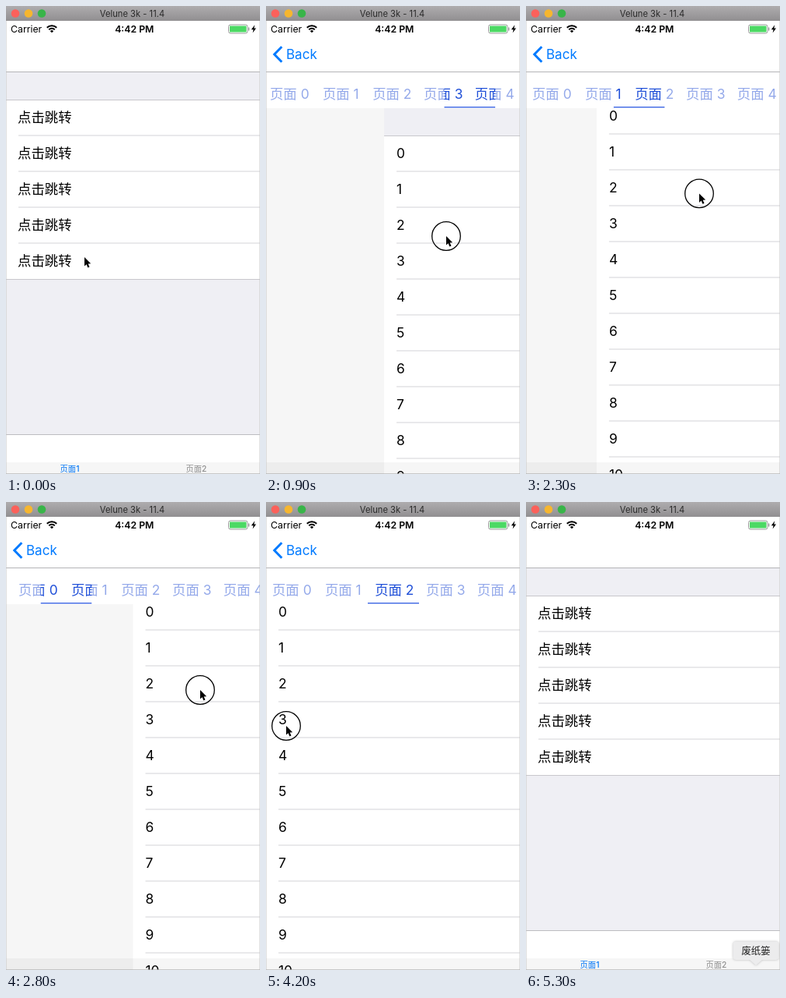
An HTML page with a canvas that plays this animation: 327x600 px, repeating every 5400 ms.

```html
<!DOCTYPE html>
<html lang="zh">
<head>
<meta charset="utf-8">
<style>
html, body { margin: 0; width: 100%; height: 100%; overflow: hidden; background: #fff; }
canvas { display: block; }
</style>
</head>
<body>
<canvas id="stage" width="327" height="600"></canvas>
<script>
const ctx = document.getElementById('stage').getContext('2d');
const W = 327, H = 600, LOOP = 5400, STEP = 100;
const FONT = 'Inter, "Noto Sans CJK SC", "Noto Sans CJK", sans-serif';
const BLUE = '#007aff', LINE = '#c8c7cc', GROUP = '#efeff4';
const ROW = 46, BODY = 17.4, TAB = 66, STRIP_BOTTOM = 131;

// Keyframes: [time, value, 'out' to decelerate into it]
const PUSH = [[200, 0], [600, 1, 'out'], [4200, 1], [4500, .465], [4600, .2], [4900, 0, 'out']];
const PAGE = [[700, 4], [900, 3.535], [1000, 3.3], [1200, 3, 'out'], [1300, 3], [1500, 2, 'out'],
  [2000, 2], [2300, 1.722], [2400, 1.55], [2600, 1, 'out'], [2600, 1], [2800, .5], [3000, 0, 'out'],
  [3600, 0], [3800, 2, 'out']];
const STRIP = [[1300, -3], [1500, 0], [2500, 0], [2700, 8], [3600, 8], [3800, 0]];
const SCROLL = [[1900, 0], [2100, 48, 'out']];
const MOUSE_X = [[100, 101], [500, 84], [700, 80], [900, 232], [1000, 285], [1300, 160], [1400, 160],
  [1600, 128], [2000, 133], [2300, 223], [2400, 270], [2600, 100], [2800, 250], [3000, 262],
  [3500, 163], [3700, 163], [4200, 26], [4500, 201], [4600, 270], [4800, 285], [5200, 296]];
const MOUSE_Y = [[100, 322], [700, 297], [1000, 294], [1300, 115], [1400, 115], [1600, 227],
  [2000, 240], [2800, 241], [3000, 238], [3500, 119], [3700, 119], [4200, 287], [4600, 286],
  [5200, 612]];
const TOUCHES = [[100, 200], [700, 1000], [1300, 1400], [2000, 2400], [2600, 2800], [3600, 3700], [4200, 4600]];
const TAB_TAPS = [[1300, 1500], [3600, 3800]];

function track(keys, t) {
  if (t <= keys[0][0]) return keys[0][1];
  for (let i = 1; i < keys.length; i++) {
    const [t0, v0] = keys[i - 1], [t1, v1, ease] = keys[i];
    if (t < t1) {
      const k = (t - t0) / (t1 - t0);
      return v0 + (v1 - v0) * (ease ? 1 - (1 - k) ** 3 : k);
    }
  }
  return keys[keys.length - 1][1];
}

const within = (spans, t) => spans.some(([a, b]) => t >= a && t <= b);

function rect(x, y, w, h, color) {
  ctx.fillStyle = color;
  ctx.fillRect(x, y, w, h);
}

function text(str, x, cy, size, color, align = 'left', weight = 400) {
  ctx.font = `${weight} ${size}px ${FONT}`;
  ctx.textAlign = align;
  ctx.fillStyle = color;
  ctx.fillText(str, x, cy + size * .365);
}

function disc(x, y, r, color) {
  ctx.fillStyle = color;
  ctx.beginPath();
  ctx.arc(x, y, r, 0, 7);
  ctx.fill();
}

function roundBox(x, y, w, h, r) {
  ctx.beginPath();
  ctx.roundRect(x, y, w, h, r);
}

function poly(points, x = 0, y = 0) {
  ctx.beginPath();
  points.forEach(([px, py]) => ctx.lineTo(x + px, y + py));
}

function clipped(x, y, w, h, draw) {
  ctx.save();
  ctx.beginPath();
  ctx.rect(x, y, w, h);
  ctx.clip();
  draw();
  ctx.restore();
}

function titleBar() {
  const shade = ctx.createLinearGradient(0, 0, 0, 19);
  shade.addColorStop(0, '#aeacae');
  shade.addColorStop(1, '#918f91');
  rect(0, 0, W, 19, shade);
  ['#fb615b', '#f6b62f', '#38b549'].forEach((c, i) => disc(12 + 17 * i, 9.5, 5.3, c));
  text('Velune 3k - 11.4', 162.5, 9.5, 11.2, '#2a2a2a', 'center');
}

function statusBar() {
  text('Carrier', 6, 29.5, 12.3, '#000');
  ctx.strokeStyle = '#000';
  ctx.lineWidth = 2;
  for (const r of [5.3, 8.8]) {
    ctx.beginPath();
    ctx.arc(59, 34, r, -2.36, -.78);
    ctx.stroke();
  }
  ctx.fillStyle = '#000';
  ctx.beginPath();
  ctx.moveTo(59, 34.3);
  ctx.arc(59, 34.3, 3, -2.36, -.78);
  ctx.fill();
  text('4:42 PM', 165.3, 29.5, 12.3, '#000', 'center', 600);
  ctx.strokeStyle = '#9a9a9a';
  ctx.lineWidth = 1;
  roundBox(286.5, 24, 24.5, 11, 2.5);
  ctx.stroke();
  rect(288, 25.5, 21.5, 8, '#4cd964');
  rect(312, 27.5, 1.3, 4, '#9a9a9a');
  ctx.fillStyle = '#000';
  poly([[320.2, 24.3], [315.8, 30.2], [318.5, 30.2], [317.6, 34.4], [322, 28.4], [319.3, 28.4]]);
  ctx.fill();
}

function navBar(push, popping) {
  rect(0, 19, W, 65, '#fff');
  rect(0, 84, W, 1, '#b4b4b7');
  if (!push) return;
  const color = popping ? '#999' : BLUE;
  ctx.globalAlpha = push * (popping ? .75 : 1);
  ctx.strokeStyle = color;
  ctx.lineWidth = 3;
  poly([[20.3, 52.2], [10.8, 62], [20.3, 71.8]]);
  ctx.stroke();
  ctx.globalAlpha = push * (popping ? .4 : 1);
  text('Back', 26 + 47 * (1 - push), 62, 17, color);
  ctx.globalAlpha = 1;
}

function homePage(push) {
  const moving = push > 0;
  rect(0, 85, W, H, GROUP);
  rect(0, 120, W, 231, '#fff');
  rect(0, 120, W, 1, LINE);
  for (let i = 0; i < 5; i++) {
    text('点击跳转', 15, 143 + ROW * i, BODY, '#000');
    const last = i === 4;
    rect(last ? 0 : 16, 166 + ROW * i - (last ? 0 : .5), W, 1, last ? LINE : '#d4d3d8');
  }
  rect(0, 549, W, 51, '#fff');
  rect(0, 549, W, 1, '#bdbdc0');
  if (moving) rect(0, 578, W, 22, GROUP);
  text('页面1', 82, 593, 10.3, BLUE, 'center', 500);
  text('页面2', 245, 593, 10.3, '#929292', 'center', 500);
  if (moving) rect(0, 85, W, H, `rgba(0,0,0,${.1 * push})`);
}

function numberList(x, scroll) {
  const top = STRIP_BOTTOM - scroll;
  rect(x, STRIP_BOTTOM, W, H, '#fff');
  rect(x, top, W, 35, GROUP);
  rect(x, top + 35, W, 1, LINE);
  for (let i = 0; i < 12; i++) {
    const y = top + 35 + ROW * i;
    text(String(i), x + 16, y + 23, BODY, '#000');
    rect(x + 16, y + ROW - .5, W, 1, '#d4d3d8');
  }
}

function tabLabels(shift, color) {
  for (let i = 0; i < 5; i++) text('页面 ' + i, 33.3 + TAB * i + shift, 113, BODY, color, 'center');
}

function detailPage(t) {
  const page = track(PAGE, t), shift = track(STRIP, t);
  const offset = within(TAB_TAPS, t) ? 0 : (Math.ceil(page) - page) * W;
  clipped(0, STRIP_BOTTOM, W, H, () => {
    rect(0, STRIP_BOTTOM, W, H, '#f6f6f6');
    numberList(offset, track(SCROLL, t));
  });
  rect(0, 85, W, STRIP_BOTTOM - 85, '#fff');
  tabLabels(shift, '#94a9ea');
  const bar = TAB * page - 1 + 9 * Math.max(0, 1 - page) + shift;
  clipped(bar, 85, TAB, 46, () => {
    rect(bar, 85, TAB, 46, '#fff');
    tabLabels(shift, '#1f4fd8');
    rect(bar, 129, TAB, 1.4, '#3d66e4');
  });
}

function pages(t, push) {
  clipped(0, 85, W, H, () => {
    const edge = W * (1 - push);
    if (push < 1) {
      ctx.save();
      ctx.translate(-.3 * W * push, 0);
      homePage(push);
      ctx.restore();
    }
    if (push > 0) {
      if (push < 1) {
        const shadow = ctx.createLinearGradient(edge - 8, 0, edge, 0);
        shadow.addColorStop(0, 'rgba(0,0,0,0)');
        shadow.addColorStop(1, 'rgba(0,0,0,.14)');
        rect(edge - 8, 85, 8, H, shadow);
      }
      ctx.save();
      ctx.translate(edge, 0);
      detailPage(t);
      ctx.restore();
    }
    rect(0, 585, W, 15, 'rgba(0,0,0,.035)');
  });
}

function pointer(t) {
  const x = track(MOUSE_X, t), y = track(MOUSE_Y, t);
  if (within(TOUCHES, t)) {
    ctx.strokeStyle = '#000';
    ctx.lineWidth = 1.3;
    ctx.beginPath();
    ctx.arc(x, y, 18.3, 0, 7);
    ctx.stroke();
  }
  poly([[0, 0], [0, 11.5], [2.6, 9.2], [4.4, 13.4], [6.5, 12.5], [4.7, 8.4], [8.2, 8.2]], x, y);
  ctx.closePath();
  ctx.strokeStyle = '#fff';
  ctx.lineWidth = 1.8;
  ctx.stroke();
  ctx.fillStyle = '#000';
  ctx.fill();
}

function dockTip() {
  ctx.save();
  ctx.shadowColor = 'rgba(0,0,0,.25)';
  ctx.shadowBlur = 3;
  roundBox(266.5, 563.5, 59, 23.5, 4);
  ctx.moveTo(288, 587);
  ctx.lineTo(296, 594);
  ctx.lineTo(304, 587);
  ctx.fillStyle = '#ececed';
  ctx.fill();
  ctx.restore();
  text('废纸篓', 296, 575, 12.4, '#222', 'center');
}

function draw() {
  const t = Math.floor(performance.now() % LOOP / STEP) * STEP;
  const push = track(PUSH, t);
  rect(0, 0, W, H, '#fff');
  pages(t, push);
  navBar(push, t > 4000 && push < 1);
  statusBar();
  titleBar();
  rect(0, 19, .5, H, '#c4c4c4');
  rect(W - .5, 19, .5, H, '#c4c4c4');
  rect(0, H - .7, W, .7, '#b5b5b5');
  if (t < 5200) pointer(t);
  else dockTip();
  requestAnimationFrame(draw);
}
draw();
</script>
</body>
</html>
```
